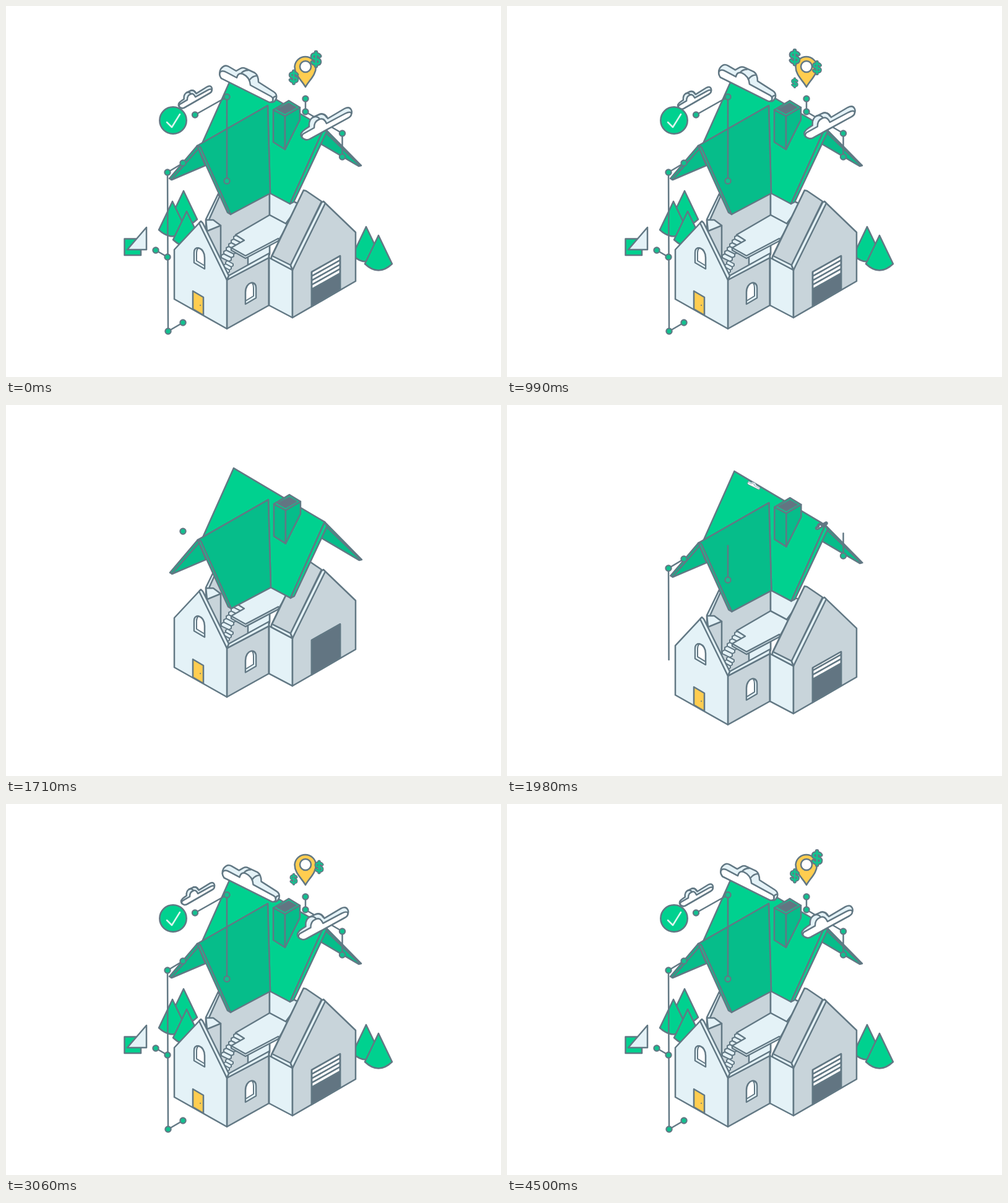
An HTML page that plays this animation: 800x600 px, repeating every 4.53 s.

```html
<!DOCTYPE html>
<html lang="en">
<head>
<meta charset="utf-8">
<title>House</title>
<style>
html, body { margin: 0; width: 100%; height: 100%; overflow: hidden; background: #fff; }
svg { display: block; width: 100%; height: 100%; }
svg * { stroke-linejoin: round; stroke-linecap: round; }
.green { fill: #00d18f; }
.deep { fill: #06bd8a; }
.light { fill: #e4f2f7; }
.grey { fill: #c8d4da; }
.slate { fill: #627582; }
.yellow { fill: #ffcd50; }
.white { fill: #fff; }
.line { fill: none; }
.thin { stroke-width: 2; }
</style>
</head>
<body>
<svg viewBox="0 0 800 600" stroke="#627884" stroke-width="2.5">
<defs>
  <g id="cloud">
    <path class="light" vector-effect="non-scaling-stroke" d="M484 216Q475 213 477 206Q479 202 484 199L490 195Q489 184 496 180L507 175Q516 173 520 182L547 166Q555 162 558 168Q561 175 553 181L491 215Q487 217 484 216Z"/>
    <path class="white" vector-effect="non-scaling-stroke" d="M484 216Q475 213 480 207L498 197Q498 187 505 184Q513 179 518 190L548 174Q556 170 558 173Q559 178 553 181L491 215Q487 217 484 216Z"/>
    <path class="line" vector-effect="non-scaling-stroke" d="M496 180Q503 177 507 183M507 175Q514 173 518 180"/>
  </g>
  <path id="sign" d="M6-5Q4-8 0-8Q-6-8-6-4Q-6-1 0 0Q6 1 6 4Q6 8 0 8Q-4 8-6 5M0-11V11"/>
  <g id="dollar" fill="none">
    <use href="#sign" stroke-width="6.800"/>
    <use href="#sign" stroke="#10c690" stroke-width="2.800"/>
  </g>
  <clipPath id="opening"><path d="M494 430L540 404V459L494 486Z"/></clipPath>
</defs>

<g id="house">
  <g id="trees"></g>
  <path class="grey" d="M343 304L324 346V372L357 440L426 402V298Z"/>
  <path class="light" d="M426 298L475 321L452 352L426 338Z"/>
  <path class="light" d="M343 304L323 345L327 348L345 308Z"/>
  <path class="light" d="M323 346L335 346L347 355L325 364Z"/>
  <path class="line" d="M323 346V366M347 355V408"/>
  <path class="light" d="M391 404L426 386V400L391 419Z"/>
  <g id="stairs" class="thin"></g>
  <path class="light" d="M371 370L426 338L456 354L440 380L387 408L364 395V391L385 379Z"/>
  <path class="line" d="M364 391L387 404L440 376"/>
  <path class="grey" d="M357 443L425 407V484L357 522Z"/>
  <path class="light" d="M360 436L425 400V407L357 443Z"/>
  <path class="light" d="M272 474V394L314 349L357 443V522Z"/>
  <path class="light" d="M312 351L315 348L318 351L360 436L357 443Z"/>
  <path class="light" d="M425 407L463 427V504L425 484Z"/>
  <path class="grey" d="M463 427L513 316L565 366V445L463 504Z"/>
  <path class="light" d="M429 405L481 298L460 420L463 427L429 409Z"/>
  <path class="grey" d="M430 404L481 298L485 299L510 316L460 419Z"/>
  <path class="light" d="M460 419L510 318L513 316L516 319L463 427Z"/>
  <path class="line" d="M425 403V484"/>
  <path class="yellow" d="M302 461L319 471V500L302 490Z"/>
  <circle class="slate" cx="314" cy="484" r="1" stroke="none"/>
  <path class="white" d="M304 415V399C304 386 321 390 321 407V425Z"/>
  <path class="light thin" d="M304 415V399Q304 391 311 391Q308 394 308 399V412L321 420V425Z"/>
  <path class="white" d="M387 482V463C387 446 404 442 404 456V472Z"/>
  <path class="light thin" d="M404 472V456Q404 449 398 448Q400 451 400 456V469L387 477V482Z"/>
  <path class="slate" d="M494 430L540 404V459L494 486Z"/>
  <g clip-path="url(#opening)"><g id="shutter"></g></g>
  <path class="line" d="M494 486V430L540 404V459"/>
</g>

<g id="roof">
  <path class="deep" d="M309 226L264 279L268 281L322 258Z"/>
  <path class="line" d="M310 232L267 281"/>
  <path class="deep" d="M514 197L574 258L570 259L507 222Z"/>
  <path class="line" d="M516 204L572 258"/>
  <path class="green" d="M367 110L514 197L459 320L427 303L423 161L317 222Z"/>
  <path class="green" d="M514 197L518 204L465 317L459 320Z"/>
  <path class="deep" d="M309 226L423 161L427 303L363 337Z"/>
  <path class="green" d="M309 226L314 228L363 337L358 334Z"/>
  <path class="deep" d="M432 168L451 178V232L432 220Z"/>
  <path class="deep" d="M451 178L475 164V184L451 232Z"/>
  <path class="green" d="M432 168L457 153L475 164L451 178Z"/>
  <path class="slate thin" d="M438 167L457 157L469 164L451 174Z"/>
</g>

<g id="links"></g>

<g id="bigCloud">
  <path class="light" d="M348 117Q343 109 347 102Q353 94 360 98L372 105L379 101Q383 99 387 101L402 108Q408 112 408 123L433 139Q438 142 437 149Q434 158 426 155Z"/>
  <path class="white" d="M348 117Q343 110 347 106Q351 104 356 107L373 116Q375 107 383 110Q394 115 395 128L428 146Q433 149 431 154Q428 157 424 155Z"/>
  <path class="line" d="M380 109Q384 104 391 104M394 119Q399 113 405 113M431 151Q432 146 437 146"/>
</g>
<use id="rightCloud" href="#cloud"/>
<g id="smallCloud"><use href="#cloud" transform="translate(-35.8 16) scale(.66 .69)"/></g>
<g id="badge">
  <circle class="green" cx="270" cy="185" r="21.7"/>
  <path id="tick" class="line" stroke="#dff7f0" pathLength="1" d="M260 188L268 196L281 175"/>
</g>
<path id="square" class="green" d="M191.500 376.500H218V403H191.500Z"/>
<path id="triangle" class="light" d="M227 358V394H196Z"/>
<g id="pin">
  <path class="yellow" d="M484 131C478 120 466.500 112 466.500 98A17.300 17.300 0 0 1 501 98C501 112 490 120 484 131Z"/>
  <circle class="white" cx="484" cy="98" r="9"/>
</g>
<g id="dollars"></g>
</svg>

<script>
const LOOP = 4530, START = 1410;
const $ = id => document.getElementById(id);
const clamp = x => Math.max(0, Math.min(1, x));
const easeOut = (t, start, length) => 1 - (1 - clamp((t - start) / length)) ** 3;
const spring = (t, size, speed) => size * Math.exp(-.0095 * t) * Math.cos(speed * t);
const elastic = (t, start) =>
  t < start ? 0 : 1 - Math.exp(-.0115 * (t - start)) * Math.cos(.026 * (t - start));

function add(parent, name, attrs) {
  const el = document.createElementNS('http://www.w3.org/2000/svg', name);
  for (const key in attrs) el.setAttribute(key, attrs[key]);
  return parent.appendChild(el);
}
const move = (el, x, y) => el.setAttribute('transform', `translate(${x} ${y})`);

function scale(el, s, x, y, dx = 0, dy = 0) {
  el.style.display = s > .01 ? '' : 'none';
  el.setAttribute('transform', `translate(${x + dx} ${y + dy}) scale(${s}) translate(${-x} ${-y})`);
}

function trace(path, part) {
  path.style.display = part ? '' : 'none';
  path.setAttribute('stroke-dasharray', `${part} 2`);
}

// apex x, apex y, start
const trees = [
  [287, 299, 590], [269, 316, 660], [292, 332, 710], [582, 357, 710], [602, 371, 660]
].map(([x, y, start]) => ({ x, y: y + 46, start, el: add($('trees'), 'path', {
  class: 'green', d: `M${x} ${y}l-22 46q22 21 44 0Z`
}) }));

for (let i = 0; i < 6; i++) {
  add($('stairs'), 'path', { class: 'light', d: `M${372 - i * 4} ${371 + i * 6}l12 6v4l-4 2l-12-6v-4Z` });
}
for (let i = 0; i < 4; i++) {
  add($('stairs'), 'path', { class: 'light', d: `M${358 - i * 3} ${412 + i * 5}l9 5v3l-3 2l-9-5v-3Z` });
}
for (let i = 0; i < 4; i++) {
  add($('shutter'), 'path', { class: 'white', d: `M494 ${430 + i * 7}l46-26v7l-46 26Z` });
}

// start, duration, points
const links = [
  [300, 480, [[286, 254], [261, 269], [262, 526], [286, 512]]],
  [720, 160, [[261, 406], [242, 395]]],
  [480, 320, [[357, 283], [357, 147], [305.5, 176]]],
  [480, 320, [[543.5, 244], [543.5, 206], [484, 171], [484, 150]]]
].map(([start, length, points], i) => {
  const group = add($('links'), 'g', {});
  const line = add(group, 'path', { class: 'line', pathLength: 1, d: 'M' + points.join('L') });
  const nodes = points.map(([x, y], n) => ({
    x, y, start: start + length * n / (points.length - 1) - (n ? 0 : 80),
    el: add(group, 'circle', { cx: x, cy: y, r: 4.6, fill: '#12c08f', 'stroke-width': 2.2 })
  }));
  return { start, length, group, line, nodes, onHouse: i < 2 };
});

// x, bottom y, climb speed, life, start
const dollars = [
  [465, 131, .0325, 1560, 1365], [465, 131, .0325, 1560, 2635], [465, 131, .0325, 1560, 3905],
  [506, 122, .05, 960, 1250], [501, 122, .05, 960, 2400], [501, 122, .05, 960, 3670]
].map(([x, y, speed, life, start]) => ({
  x, y, speed, life, start, el: add($('dollars'), 'use', { href: '#dollar' })
}));

function draw(now) {
  const t = (now - START + LOOP) % LOOP;
  const rise = Math.max(0, t - 30), drift = t - 3120;
  const houseY = spring(rise, 1434, .00754);
  move($('house'), 0, houseY);
  move($('roof'), 2.6 * Math.exp(-rise / 270), spring(rise, 526, .00653));
  move($('shutter'), 0, -30 * (1 - easeOut(t, 450, 380)));

  for (const { x, y, start, el } of trees) scale(el, elastic(t, start), x, y);

  for (const { start, length, group, line, nodes, onHouse } of links) {
    move(group, 0, onHouse ? houseY : 0);
    trace(line, clamp((t - start) / length));
    for (const node of nodes) scale(node.el, easeOut(t, node.start, 90), node.x, node.y);
  }

  scale($('bigCloud'), easeOut(t, 550, 260), 391, 126, -.0031 * drift, -.0016 * drift);
  scale($('rightCloud'), easeOut(t, 550, 260), 518, 190, .0038 * drift, -.002 * drift);
  scale($('smallCloud'), easeOut(t, 750, 290), 306, 147, -.0028 * drift, .0015 * drift);
  scale($('badge'), easeOut(t, 930, 260), 270, 185);
  trace($('tick'), clamp((t - 1080) / 180));
  scale($('square'), easeOut(t, 640, 180), 205, 390);
  scale($('triangle'), easeOut(t, 840, 250), 196, 394);
  scale($('pin'), easeOut(t, 780, 300), 484, 131);

  for (const { x, y, speed, life, start, el } of dollars) {
    const age = t - start;
    const size = Math.min(1, .43 + age * .00093) * clamp(age / 100) * clamp((life - age) / 80);
    scale(el, size, 0, 0, x, y - speed * age);
  }
  requestAnimationFrame(draw);
}
requestAnimationFrame(() => draw(performance.now()));
</script>
</body>
</html>
```
